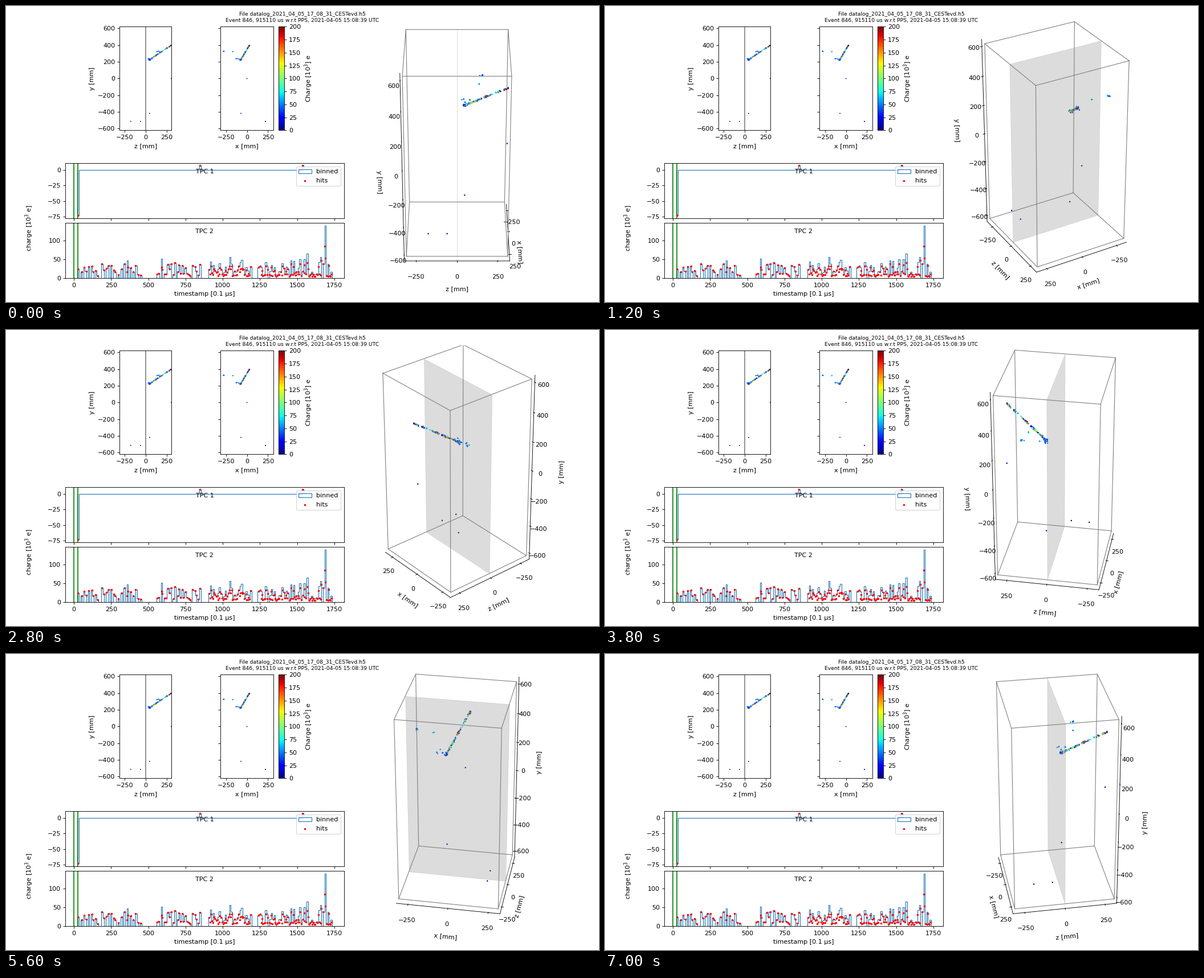
Animation, 1040 px wide and 520 px high, one loop 7200 ms. Source, as a matplotlib script:

```python
import itertools

import numpy as np
import matplotlib.pyplot as plt
from matplotlib.animation import FuncAnimation
from mpl_toolkits.mplot3d.art3d import Poly3DCollection

W, H, DPI = 1040, 520, 80
FRAMES, INTERVAL = 36, 200
HALF, TALL = 310.4, 620.8      # detector half sizes in mm
PITCH = 4.434                  # pixel pitch in mm

rng = np.random.default_rng(846)
fig = plt.figure(figsize=(W / DPI, H / DPI), dpi=DPI)
fig.suptitle("File datalog_2021_04_05_17_08_31_CESTevd.h5\n"
             "Event 846, 915110 us w.r.t PPS, 2021-04-05 15:08:39 UTC",
             fontsize="small")


def add_axes(left, top, right, bottom, **kwargs):
    """Axes placed by pixel edges measured from the top left."""
    return fig.add_axes([left / W, 1 - bottom / H,
                         (right - left) / W, (bottom - top) / H], **kwargs)


def cloud(centre, count, spread, low, high):
    """Hits scattered about a point, as rows of x, z, y, charge."""
    pos = centre + rng.normal(0, 1, (count, 3)) * spread
    return np.c_[pos, rng.uniform(low, high, count)]


def make_track():
    """A straight track with a few gaps and a blob at its lower end."""
    start, end = np.array([-74, 44, 225]), np.array([29, 304, 397])
    t = np.sort(rng.random(165))
    gaps = ((.4, .45), (.65, .72), (.83, .9))
    t = t[[not any(a < v < b for a, b in gaps) for v in t]]
    pos = start + t[:, None] * (end - start) + rng.normal(0, 2, (len(t), 3))
    charge = np.clip(rng.gamma(2, 45, len(t)), 8, 195)
    hits = np.vstack([np.c_[pos, charge],
                      cloud((-74, 50, 226), 14, (4, 8, 3), 6, 70)])
    hits[:, [0, 2]] = np.round(hits[:, [0, 2]] / PITCH) * PITCH
    hits[:, 1] = np.clip(hits[:, 1], 28, 304)
    return hits


def make_hits():
    groups = [cloud(centre, count, (4, 5, 2), 25, 75) for centre, count in (
        ((-276, 157, 325), 7), ((-167, 135, 322), 2), ((-124, 34, 238), 3),
        ((-121, 80, 239), 2), ((-94, 55, 234), 2))]
    singles = [cloud(centre, 1, 0, 13, 17) for centre in (
        (0, 306, 0), (-72, 48, -418), (221, -177, -514), (221, -61, -514))]
    return np.vstack([make_track(), *groups, *singles]).T


x, z, y, q = make_hits()
colours = dict(c=q, cmap="jet", vmin=0, vmax=200)

# Flat projections
ax_zy = add_axes(199.2, 36.4, 290.4, 218.4)
ax_xy = add_axes(376.2, 36.4, 469, 218.4)
for ax, u, name, limit in ((ax_zy, z, "z", 310), (ax_xy, x, "x", 316)):
    dots = ax.scatter(u, y, s=2.8, lw=0, **colours)
    ax.set(xlim=(-limit, limit), ylim=(-TALL, TALL), xlabel=f"{name} [mm]",
           xticks=(-250, 0, 250), yticks=range(-600, 601, 200))
ax_zy.axvline(0, color="gray")
ax_zy.set_ylabel("y [mm]")
ax_xy.tick_params(labelleft=False)
bar = fig.colorbar(dots, cax=add_axes(478, 36.4, 488, 218.4),
                   ticks=range(0, 201, 25))
bar.set_label("Charge [$10^3$] e")


def pulses(first, last, count, low_share, peak):
    """Evenly strewn hits, a share of them small, the rest up to a peak."""
    step = (last - first) / count
    t = np.linspace(first, last, count) + rng.uniform(-.4, .4, count) * step
    small = rng.random(count) < low_share
    rise = 1 + .7 * np.exp(-((t - 1640) / 70) ** 2)
    charge = np.where(small, rng.uniform(5, 13, count),
                      rng.uniform(13, peak, count) * rise)
    return np.c_[t, charge]


# Charge against time
tpc1 = np.array([(25, -73.5), (848, 7), (1537, 7)])
tpc2 = np.vstack([pulses(32, 450, 26, .2, 44), pulses(562, 845, 25, .35, 42),
                  pulses(908, 1188, 42, .45, 34),
                  pulses(1242, 1672, 62, .45, 38),
                  [(1687, 85), (1690, 54)], pulses(1700, 1732, 6, .6, 30)])

ax_t1 = add_axes(104, 276.4, 592.8, 373.4)
ax_t2 = add_axes(104, 381.4, 592.8, 478.4)
for ax, hits, ylim, last, name in (
        (ax_t1, tpc1, (-78, 10.5), 1545, "TPC 1"),
        (ax_t2, tpc2, (0, 146.5), 1745, "TPC 2")):
    t, charge = hits.T
    ax.hist(t, bins=np.arange(24, last, 10), weights=charge,
            histtype="step", lw=1, color="C0", label="binned")
    ax.scatter(t, charge, s=10, lw=0, color="red", label="hits", zorder=3)
    for edge in (0, 25):
        ax.axvline(edge, color="green")
    ax.text(.5, .9, name, transform=ax.transAxes, ha="center", va="top")
    ax.set(xlim=(-58, 1815), ylim=ylim, xticks=range(0, 1751, 250))
ax_t1.set_yticks((-75, -50, -25, 0))
ax_t2.set_yticks((0, 50, 100))
ax_t1.legend(loc="upper right")
ax_t2.set_xlabel("timestamp [0.1 µs]")
fig.text(41 / W, 1 - 390 / H, "charge [$10^3$ e]", rotation=90,
         ha="center", va="center")

# Rotating view of the detector, with its height on the vertical axis
ax3 = add_axes(564, 26.5, 1006, 468.5, projection="3d")
ax3.set_facecolor("none")
ax3.grid(False)
for axis in (ax3.xaxis, ax3.yaxis, ax3.zaxis):
    axis.set_pane_color((1, 1, 1, 0))

size = np.array([HALF, HALF, TALL])
corners = np.array(list(itertools.product((-1, 1), repeat=3)))
for a, b in itertools.combinations(corners, 2):
    if np.abs(a - b).sum() == 2:
        ax3.plot(*np.array([a * size, b * size]).T, color="gray", lw=1)

cathode = [(-HALF, 0, -TALL), (HALF, 0, -TALL),
           (HALF, 0, TALL), (-HALF, 0, TALL)]
veil = (.5, .5, .5, .27)
ax3.add_collection3d(Poly3DCollection([cathode], facecolor=veil,
                                      edgecolor=veil, lw=.5))
ax3.scatter(x, z, y, s=5, lw=0, depthshade=False, **colours)

margin = 25 / 24
ax3.set_xlim(-HALF * margin, HALF * margin)
ax3.set_ylim(-HALF * margin, HALF * margin)
ax3.set_zlim(-TALL * margin, TALL * margin)
ax3.set_box_aspect((1, 1, 2))
ax3.set(xlabel="x [mm]", ylabel="z [mm]",
        xticks=(-250, 0, 250), yticks=(-250, 0, 250),
        zticks=range(-600, 601, 200))
ax3.set_zlabel("y [mm]", labelpad=20)


def update(frame):
    # The tiny offset settles which side the axes take at right angles.
    ax3.view_init(elev=30, azim=frame * 360 / FRAMES + .001)
    return []


anim = FuncAnimation(fig, update, frames=FRAMES, interval=INTERVAL,
                     init_func=lambda: update(0), repeat=True, repeat_delay=0)
plt.show()
```
